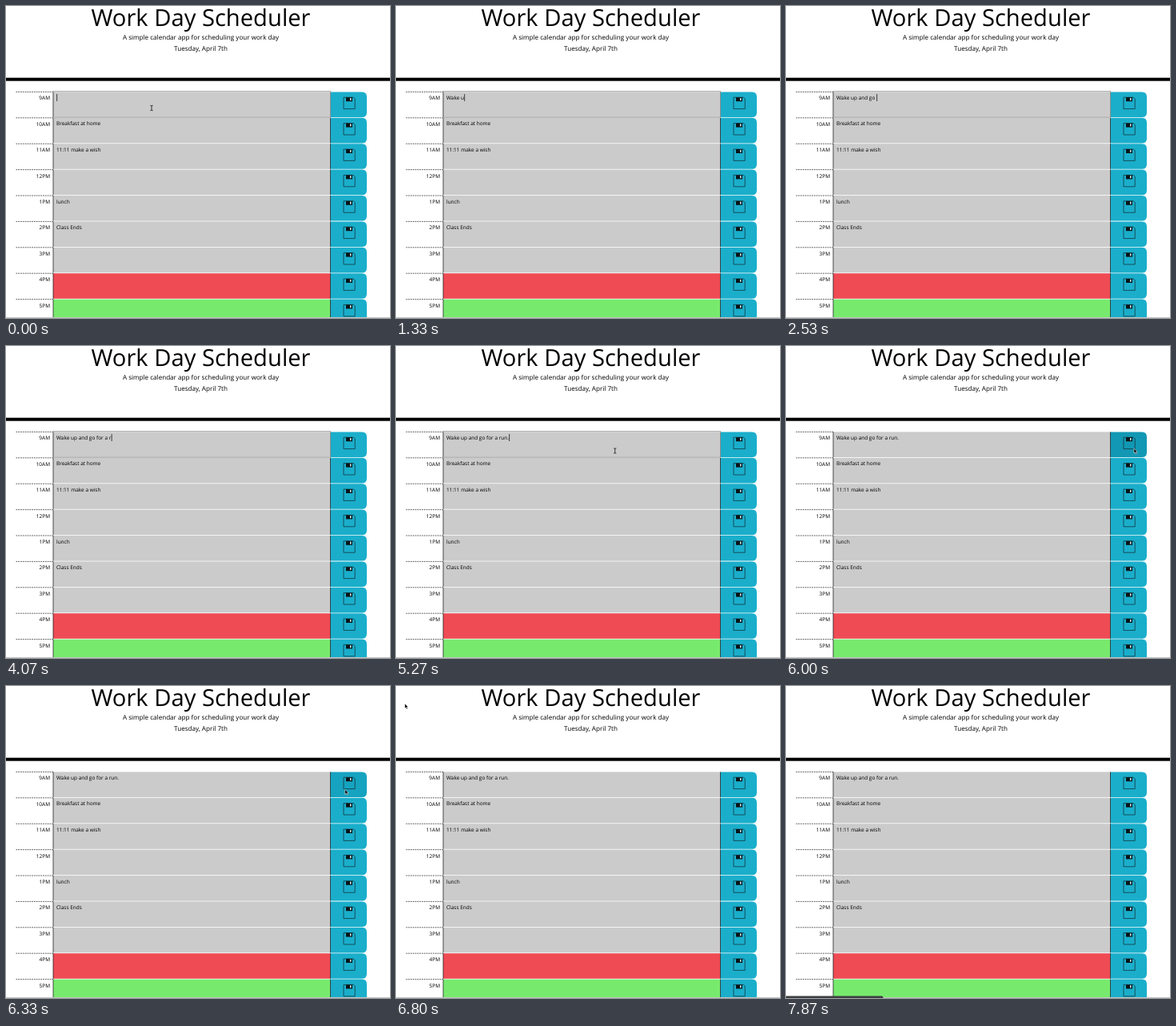
Write an HTML page that moves like this. It is 480 px wide and 390 px high and loops after 8000 ms.

```html
<!DOCTYPE html>
<html lang="en">
<head>
<meta charset="utf-8">
<title>Work Day Scheduler</title>
<style>
  html, body { margin: 0; width: 100%; height: 100%; overflow: hidden; background: #fff; }
  svg { display: block; width: 480px; height: 390px; }
  text { font: 6.48px "Open Sans", sans-serif; white-space: pre; text-rendering: geometricPrecision; }
  .title { font-size: 29.16px; }
  .lead { font-size: 8.1px; }
  .middle { text-anchor: middle; }
  .end { text-anchor: end; }
</style>
</head>
<body>
<svg id="stage" viewBox="0 0 480 390"></svg>
<script>
const LOOP = 8000, ROW = 32.4, TOP = 107;
const TEAL = [26, 174, 203], TEAL_HOVER = [18, 152, 180];
const stage = document.getElementById('stage');

function add(tag, attrs, content = '') {
  const el = document.createElementNS('http://www.w3.org/2000/svg', tag);
  for (const name in attrs) el.setAttribute(name, attrs[name]);
  el.textContent = content;
  return stage.appendChild(el);
}
const rect = (x, y, width, height, fill) => add('rect', { x, y, width, height, fill });
const path = (d, attrs) => add('path', { d, fill: 'none', ...attrs });
const label = (x, y, content, cls = '') => add('text', { x, y, class: cls }, content);
const show = (el, on) => el.setAttribute('visibility', on ? 'visible' : 'hidden');

// Header
label(243.5, 25, 'Work Day Scheduler', 'title middle');
label(243.5, 42, 'A simple calendar app for scheduling your work day', 'lead middle');
label(243.5, 56, 'Tuesday, April 7th', 'lead middle');
rect(0, 89.7, 480, 4, '#000');

// Time blocks
const hours = ['9AM', '10AM', '11AM', '12PM', '1PM', '2PM', '3PM', '4PM', '5PM'];
const notes = ['', 'Breakfast at home', '11:11 make a wish', '', 'lunch', 'Class Ends', '', '', ''];
const rows = hours.map((hour, i) => {
  const y = TOP + i * ROW;
  path(`M12.5 ${y + .4}H59`, { stroke: '#333', 'stroke-width': .8, 'stroke-dasharray': '1.8 1' });
  label(55, y + 10.4, hour, 'end');
  rect(59, y + .4, 346.5, ROW - .8, i < 7 ? '#cbcbcb' : i < 8 ? '#ef4b55' : '#77ea6e');
  const button = path(
    `M405.5 ${y + .4}h39.5q6 0 6 6v${ROW - 12.8}q0 6 -6 6h-39.5z`, { fill: `rgb(${TEAL})` });
  path(`M59 ${y + .4}v${ROW - .8}M405.5 ${y + .4}v${ROW - .8}`, { stroke: '#222', 'stroke-width': .8 });

  // Floppy disk icon
  path(`M422 ${y + 7.2}h12.4l1.8 1.8v12.6h-14.2z`, { stroke: '#14363f', 'stroke-width': .8 });
  rect(425, y + 7.2, 8, 5, '#0a1418');
  rect(430, y + 8, 1.5, 3, '#d5edf3');

  return { button, note: label(63, y + 10, notes[i]) };
});
const focusRing = add('rect', {
  x: 58.8, y: 106.7, width: 346.8, height: 32.5, fill: 'none', stroke: '#999', 'stroke-width': .9
});
const caret = rect(0, 110, .7, 9, '#000');
rect(0, 389, 480, 1, '#c4c4c4');
const statusBar = add('path', { d: 'M0 387.4H119.5q2 0 2 2V390H0z', fill: '#3c3e40' });

// Mouse pointers, drawn around their hot spot
const beam = path('M-1.6 -3.2Q0 -3.2 0 -2.4Q0 -3.2 1.6 -3.2M0 -2.6V2.6M-1.6 3.2Q0 3.2 0 2.4Q0 3.2 1.6 3.2',
  { stroke: '#111', 'stroke-width': .8 });
const arrow = path('M0 0V6L1.4 4.8L2.4 7L3.5 6.5L2.5 4.4H4.4Z',
  { fill: '#000', stroke: '#fff', 'stroke-width': .5 });

// Each character is one key press; "<" is backspace
const keys = 'Wake up and go fro<<<for a run.';
const keyTimes = [330, 600, 800, 930, 1070, 1270, 1470, 1530, 1670, 1800, 1930, 2000,
  2270, 2400, 2530, 2670, 2670, 2730, 3130, 3270, 3270, 3330, 3470, 3530,
  3670, 3800, 3930, 4070, 4200, 4400, 4670];
const typedAt = t => [...keys].reduce((text, key, i) =>
  t < keyTimes[i] ? text : key === '<' ? text.slice(0, -1) : text + key, '');

// Pointer way points: time, x, y
const track = [
  [0, 182, 127.5], [5065, 182, 127.5], [5330, 300, 132], [5530, 415, 136], [5800, 435, 126.5],
  [6000, 435, 128], [6200, 428, 136], [6330, 424.5, 129.5], [6400, 372, 114],
  [6530, 184, 64], [6670, 184, 64], [6800, 11, 22], [LOOP, 11, 22]
];
function pointerAt(t) {
  const i = track.findIndex(p => p[0] > t);
  const [t0, x0, y0] = track[i - 1], [t1, x1, y1] = track[i];
  const k = (t - t0) / (t1 - t0);
  return [x0 + (x1 - x0) * k, y0 + (y1 - y0) * k];
}

const ramp = (t, from, to) => Math.min(1, Math.max(0, (t - from) / (to - from)));

function draw(t) {
  const note = rows[0].note;
  note.textContent = typedAt(t);
  const focused = t < 5930;
  caret.setAttribute('x', 63.4 + (note.textContent ? note.getComputedTextLength() : 0));
  show(caret, focused);
  show(focusRing, focused);

  const hover = ramp(t, 5510, 5660) - .5 * ramp(t, 6250, 6330) - .5 * ramp(t, 6330, 6470);
  const color = TEAL.map((c, i) => Math.round(c + (TEAL_HOVER[i] - c) * hover));
  rows[0].button.setAttribute('fill', `rgb(${color})`);

  const [x, y] = pointerAt(t);
  const visible = t < 330 || (t >= 5130 && t < 6870);
  const overText = x > 59 && x < 405 && y > TOP;
  for (const el of [beam, arrow]) el.setAttribute('transform', `translate(${x} ${y})`);
  show(beam, visible && overText);
  show(arrow, visible && !overText);

  statusBar.setAttribute('opacity', t < 7800 ? 0 : t < 7870 ? .5 : 1);
}

const start = performance.now();
function tick() {
  draw((performance.now() - start) % LOOP);
  requestAnimationFrame(tick);
}
tick();
</script>
</body>
</html>
```
